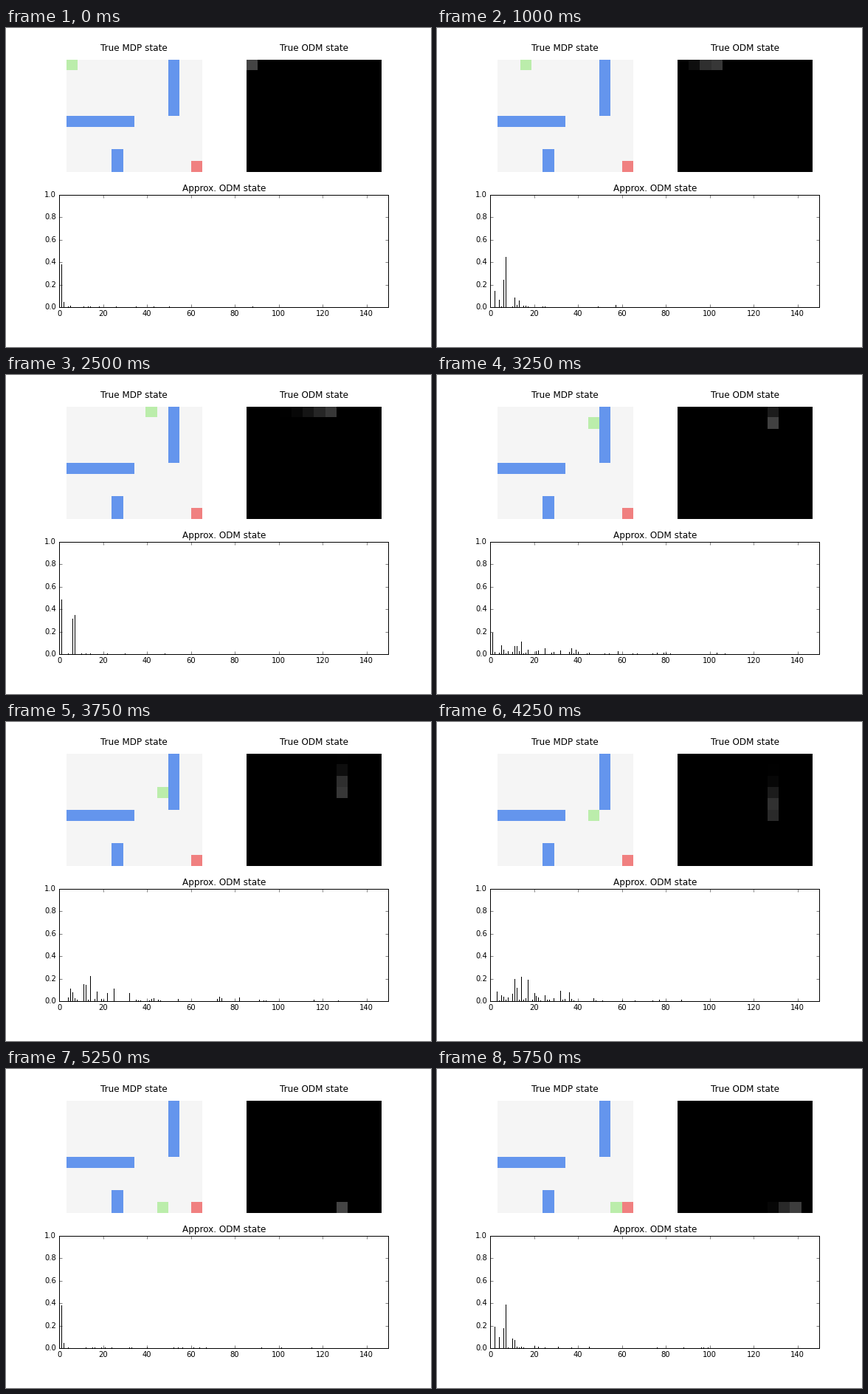
Animation of 576 by 432 pixels, one loop 6 s. Source, as a matplotlib script:

```python
import math

import matplotlib.pyplot as plt
import numpy as np
from matplotlib.animation import FuncAnimation

W, H, DPI = 576, 432, 72
FRAMES, STEP_MS = 24, 250
ROWS, COLS = 10, 12
SUCCESS = 0.8
N_BASIS = 150
TURN_DOWN, TURN_RIGHT = 11, 21  # frames that open the second and third leg

plt.rcParams.update({"font.family": "DejaVu Sans", "font.size": 10})

ROW_EDGES = np.array([43, 57, 73, 88, 103, 119, 134, 149, 164, 180, 195])
FLOOR, WALL = (245, 245, 245), (100, 149, 237)
GOAL, AGENT = (240, 128, 128), (187, 237, 171)

# Main weights at the key moments; they are blended in between.
REST = {1: .381, 2: .045}
PEAKS = {
    0: REST,
    4: {2: .145, 4: .065, 6: .245, 7: .45, 11: .085, 13: .06},
    6: {1: .06, 6: .35, 7: .485, 11: .065, 13: .05},
    10: {1: .485, 6: .315, 7: .35},
    TURN_DOWN: REST,
    15: {5: .11, 6: .08, 11: .15, 12: .145, 14: .225, 17: .085, 22: .07,
         25: .11, 32: .07},
    19: {3: .165, 10: .125, 11: .25, 12: .085, 14: .215, 17: .29, 20: .145,
         32: .11, 36: .125},
    TURN_RIGHT: REST,
    23: {2: .19, 4: .1, 6: .18, 7: .385, 10: .085, 11: .075},
}


def col_edges(left, right):
    return np.floor(np.linspace(left, right, COLS + 1) + 0.49).astype(int)


def enlarge(cells, xs):
    tall = np.repeat(cells, np.diff(ROW_EDGES), axis=0)
    return np.repeat(tall, np.diff(xs), axis=1)


def agent_cell(k):
    if k <= TURN_DOWN:
        slips = (k >= 3) + (k >= 9)
        return 0, max(0, k - 1 - slips)
    if k <= TURN_RIGHT:
        return k - 12, 8
    return 9, k - 13


def maze(k):
    cells = np.full((ROWS, COLS, 3), FLOOR, np.uint8)
    cells[:5, 9] = WALL
    cells[5, :6] = WALL
    cells[8:, 4] = WALL
    cells[9, 11] = GOAL
    cells[agent_cell(k)] = AGENT
    return cells


def belief(k):
    """Spread of an open-loop walk whose every step succeeds with SUCCESS."""
    if k < TURN_DOWN:
        n, place = max(0, min(k, 9) - 1), lambda i: (0, min(i, 7))
    elif k < TURN_RIGHT:
        n, place = max(0, k - 12), lambda i: (i, 8)
    else:
        n, place = k - TURN_RIGHT, lambda i: (9, 8 + i)
    prob = np.zeros((ROWS, COLS))
    for i in range(n + 1):
        prob[place(i)] += math.comb(n, i) * SUCCESS**i * (1 - SUCCESS) ** (n - i)
    return prob


def belief_cells(k):
    gray = (70 * np.tanh(2.1 * belief(k))).round().astype(np.uint8)
    return np.repeat(gray[:, :, None], 3, axis=2)


def peak_weights(k):
    times = list(PEAKS)
    return np.array([np.interp(k, times, [p.get(i, 0) for p in PEAKS.values()])
                     for i in range(N_BASIS)])


def small_weights(k):
    """Scattered low bars, denser and wider on the way down."""
    if k < TURN_DOWN:
        count, reach, size = 14, 14, 0.004
    elif k < TURN_RIGHT:
        count, reach, size = 42, 45, 0.016
    else:
        count, reach, size = 24, 45, 0.004
    rng = np.random.default_rng(k)
    index = 4 + rng.exponential(reach, count).astype(int)
    height = 0.005 + rng.exponential(size, count) * np.exp(-index / 120)
    w = np.zeros(N_BASIS)
    keep = index < 140
    w[index[keep]] = height[keep]
    return w


def spikes(k):
    w = np.maximum(peak_weights(k), small_weights(k))
    return [[(i, 0), (i, v)] for i, v in enumerate(w) if v > 0.004]


def grid_view(xs, cells):
    x0, x1, y0, y1 = xs[0], xs[-1], ROW_EDGES[0], ROW_EDGES[-1]
    ax = fig.add_axes([x0 / W, 1 - y1 / H, (x1 - x0) / W, (y1 - y0) / H])
    ax.axis("off")
    return ax.imshow(enlarge(cells, xs), aspect="auto", interpolation="nearest")


def heading(x, y, text):
    fig.text(x / W, 1 - y / H, text, size=12, ha="center", va="baseline")


fig = plt.figure(figsize=(W / DPI, H / DPI), dpi=DPI, facecolor="white")

maze_xs, belief_xs = col_edges(82, 266), col_edges(326, 509)
maze_img = grid_view(maze_xs, maze(0))
belief_img = grid_view(belief_xs, belief_cells(0))
heading(173.4, 31.2, "True MDP state")
heading(417.9, 31.2, "True ODM state")
heading(295.2, 220.8, "Approx. ODM state")

chart = fig.add_axes([0.125, 0.125, 0.775, 0.775 / 2.2])
chart.set(xlim=(0, N_BASIS), ylim=(0, 1),
          xticks=range(0, N_BASIS, 20), yticks=np.arange(6) / 5)
chart.tick_params(direction="in", length=4, width=0.5, pad=4, top=True, right=True)
plt.setp(chart.get_yticklabels(), va="center")
for spine in chart.spines.values():
    spine.set_linewidth(1)
bars = chart.vlines([], [], [], colors="black", linewidth=1, capstyle="projecting")


def draw(k):
    maze_img.set_data(enlarge(maze(k), maze_xs))
    belief_img.set_data(enlarge(belief_cells(k), belief_xs))
    bars.set_segments(spikes(k))
    return maze_img, belief_img, bars


anim = FuncAnimation(fig, draw, frames=FRAMES, interval=STEP_MS,
                     repeat=True, repeat_delay=0, blit=False)
plt.show()
```
